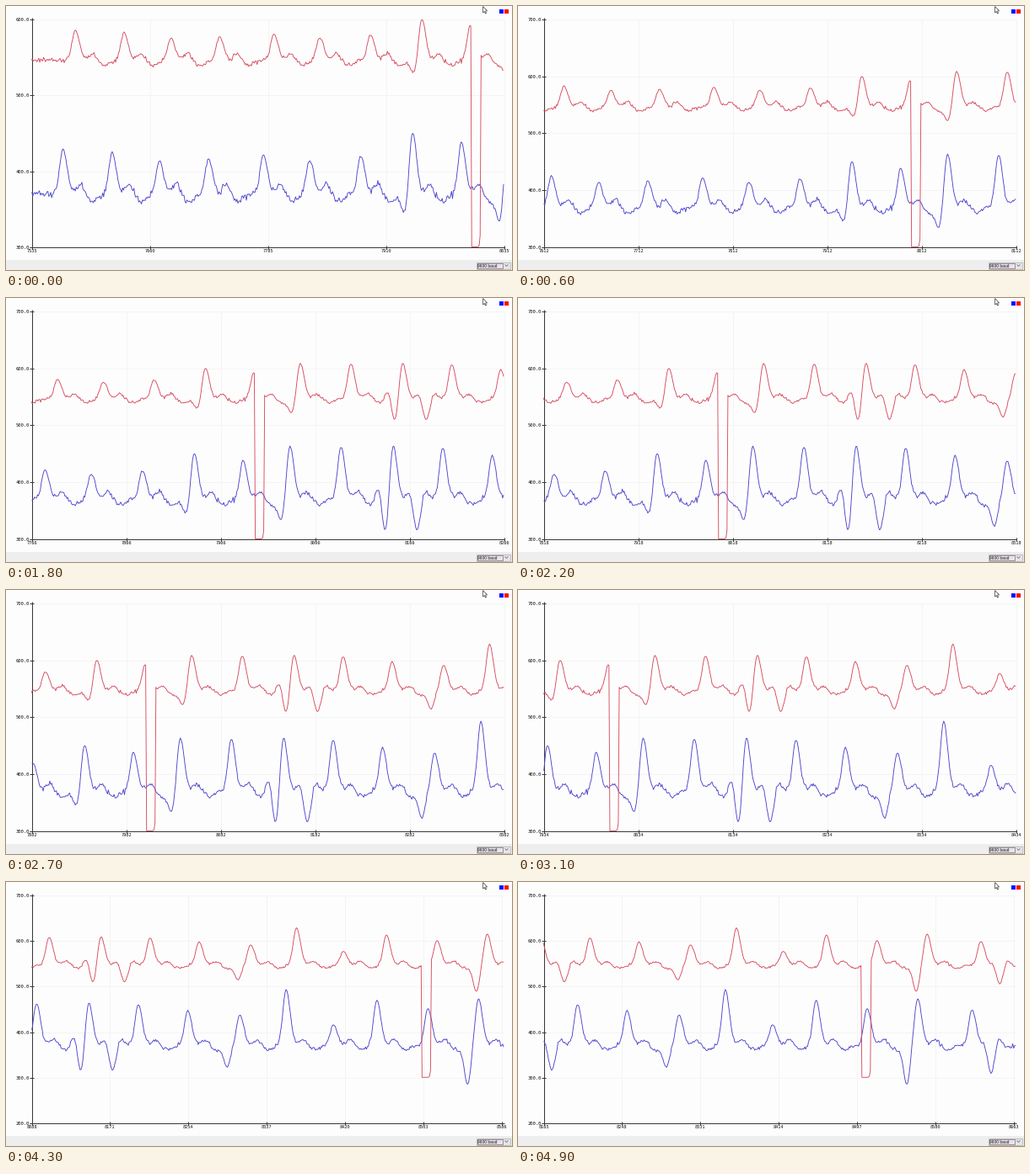
Animation of 600x314 px, one loop 5 s. Source, as a matplotlib script:

```python
import matplotlib.pyplot as plt
import numpy as np
from matplotlib.animation import FuncAnimation
from matplotlib.patches import Polygon, Rectangle

WIDTH, HEIGHT, DPI = 600, 314, 100
PX = 72 / DPI                       # one pixel in points
FRAMES, INTERVAL = 50, 100
LEFT, TOP, BOTTOM, RIGHT = 31, 15.5, 286.5, 590
CAPACITY, TICK_STEP = 500, 1.12
BLUE_STEP, RED_STEP = 1.121, 1.111  # pixels per sample
START, SPEED = 7535, 12.86          # first sample, samples per frame
REST, LAG = 370, 9
BLUE_COLOR, RED_COLOR = "#4a44cc", "#d44a5c"
AXIS_COLOR, GRID_COLOR = "#383838", "#f5f4f5"

# Pulse peaks: sample number, reading
BEATS = [
    (7568, 429), (7620, 424), (7670, 413), (7722, 416), (7780, 421),
    (7829, 414), (7883, 420), (7937.7, 452), (7989.5, 438), (8039, 464),
    (8093, 462), (8148, 466), (8200.7, 460), (8253, 446), (8308, 437),
    (8357, 492), (8407, 415), (8453, 469), (8507, 452), (8560.5, 473),
    (8618, 449),
]

# Irregular swings: sample number, offset from rest
SWINGS = [(7929.5, -28), (8030, -36), (8133, 24), (8140, -64), (8173, -52),
          (8182, 20), (8294.5, -46), (8549, -84), (8638, -72), (8647, 26)]


def bump(centre, height, rise, fall):
    width = np.where(SAMPLES < centre, rise, fall)
    return height * np.exp(-0.5 * ((SAMPLES - centre) / width) ** 2)


def blue_signal():
    shape = np.zeros(SAMPLES.size)
    for centre, reading in BEATS:
        shape += bump(centre, reading - REST, 3.5, 4.2)
        shape += bump(centre + 18, 13, 4, 4)       # echo of the pulse
        shape += bump(centre + 31, -10, 5, 5)      # sag before the next one
    for centre, offset in SWINGS:
        shape += bump(centre, offset, 3.5, 3.5)
    noise = np.random.default_rng(7).normal(0, 2.7, SAMPLES.size)
    return REST + shape + noise / (1 + np.abs(shape) / 30)


def red_signal():
    """A smaller, later copy of blue that drops out every 500 samples."""
    red = 298 + 0.67 * np.roll(BLUE, LAG)
    phase = SAMPLES % 500
    dropout = 300 + 15 * np.exp(1.8 * (phase - 9.0).clip(max=0))
    return np.where(phase < 10, dropout, red)


SAMPLES = np.arange(START - 50, START + int(SPEED * FRAMES) + CAPACITY + 20)
BLUE = blue_signal()
RED = red_signal()

fig = plt.figure(figsize=(WIDTH / DPI, HEIGHT / DPI), dpi=DPI, facecolor="#fefdfe")
ax = fig.add_axes([0, 0, 1, 1])
ax.set_xlim(0, WIDTH)
ax.set_ylim(HEIGHT, 0)
ax.axis("off")


def line(x, y, color, width=1.0, z=2):
    return ax.plot(x, y, color=color, lw=width * PX, zorder=z,
                   solid_capstyle="butt", solid_joinstyle="round")[0]


def box(x, y, w, h, face, edge="none"):
    ax.add_patch(Rectangle((x, y), w, h, fc=face, ec=edge, lw=0.8 * PX, zorder=4))


def label(x, y, text, size=5.5, font="DejaVu Sans Mono", ha="center"):
    return ax.text(x, y, text, fontsize=size * PX, family=font, ha=ha,
                   va="center_baseline", color="#101010", zorder=6)


def draw_window():
    line([LEFT - 0.5] * 2, [TOP - 2, BOTTOM + 2], AXIS_COLOR)
    line([LEFT - 3, RIGHT + 1], [BOTTOM] * 2, AXIS_COLOR)
    box(585, 4, 5, 5, "#0000ff")
    box(591, 4, 5, 5, "#ff0000")
    box(0, 302, WIDTH, 12, "#eeeeee")
    box(557.5, 304.5, 40, 8, "#e6e6e6", "#b4b4b4")
    box(558.5, 305.5, 30, 6, "#e9e2ea", "#8a7a8a")
    label(559.3, 308.6, "9600 baud", 4.9, "Liberation Sans", "left")
    line([591.5, 593.5, 595.5], [307.5, 309.5, 307.5], "#707070", 0.8, 6)
    arrow = [(565.5, 0.5), (565.5, 8), (567.3, 6.5), (568.5, 9),
             (569.6, 8.5), (568.5, 6), (570.6, 5.8)]
    ax.add_patch(Polygon(arrow, fc="white", ec="#505050", lw=0.8 * PX, zorder=6))


def visible(values, start, step):
    x = RIGHT - (start + CAPACITY - 1 - SAMPLES) * step
    shown = (x >= LEFT - 1) & (x <= RIGHT)
    return x[shown], values[shown]


moving = []


def update(frame):
    while moving:
        moving.pop().remove()
    start = round(START + SPEED * frame)
    blue_x, blue = visible(BLUE, start, BLUE_STEP)
    red_x, red = visible(RED, start, RED_STEP)
    # a small tolerance keeps noise from changing the scale
    low = 100 * int((min(blue.min(), red.min()) + 5) // 100)
    high = 100 * int((max(blue.max(), red.max()) - 5) // 100 + 1)

    def to_y(value):
        return BOTTOM - (value - low) / (high - low) * (BOTTOM - TOP)

    levels = range(low, high + 1, 100)
    for level in levels:
        y = round(to_y(level) - 0.5) + 0.5
        moving.append(line([LEFT, RIGHT + 1], [y, y], GRID_COLOR, z=1))
        moving.append(line([LEFT - 3, LEFT + 2], [y, y], AXIS_COLOR))
        moving.append(label(27.5, y + 0.5, f"{level:.1f}", ha="right"))

    spacing = CAPACITY // len(levels)
    for i in range(len(levels) + 1):
        x = int(LEFT + i * spacing * TICK_STEP + 0.01)
        moving.append(line([x - 0.5] * 2, [TOP, BOTTOM], GRID_COLOR, z=1))
        moving.append(line([x - 0.5] * 2, [BOTTOM - 2, BOTTOM + 2], AXIS_COLOR))
        moving.append(label(x, 291.2, str(start + i * spacing), 5.3))

    moving.append(line(blue_x, to_y(blue), BLUE_COLOR, 0.9, 3))
    moving.append(line(red_x, to_y(red), RED_COLOR, 0.9, 3))
    return moving


draw_window()
animation = FuncAnimation(fig, update, frames=FRAMES, interval=INTERVAL,
                          repeat=True, repeat_delay=0, blit=False)
plt.show()
```
